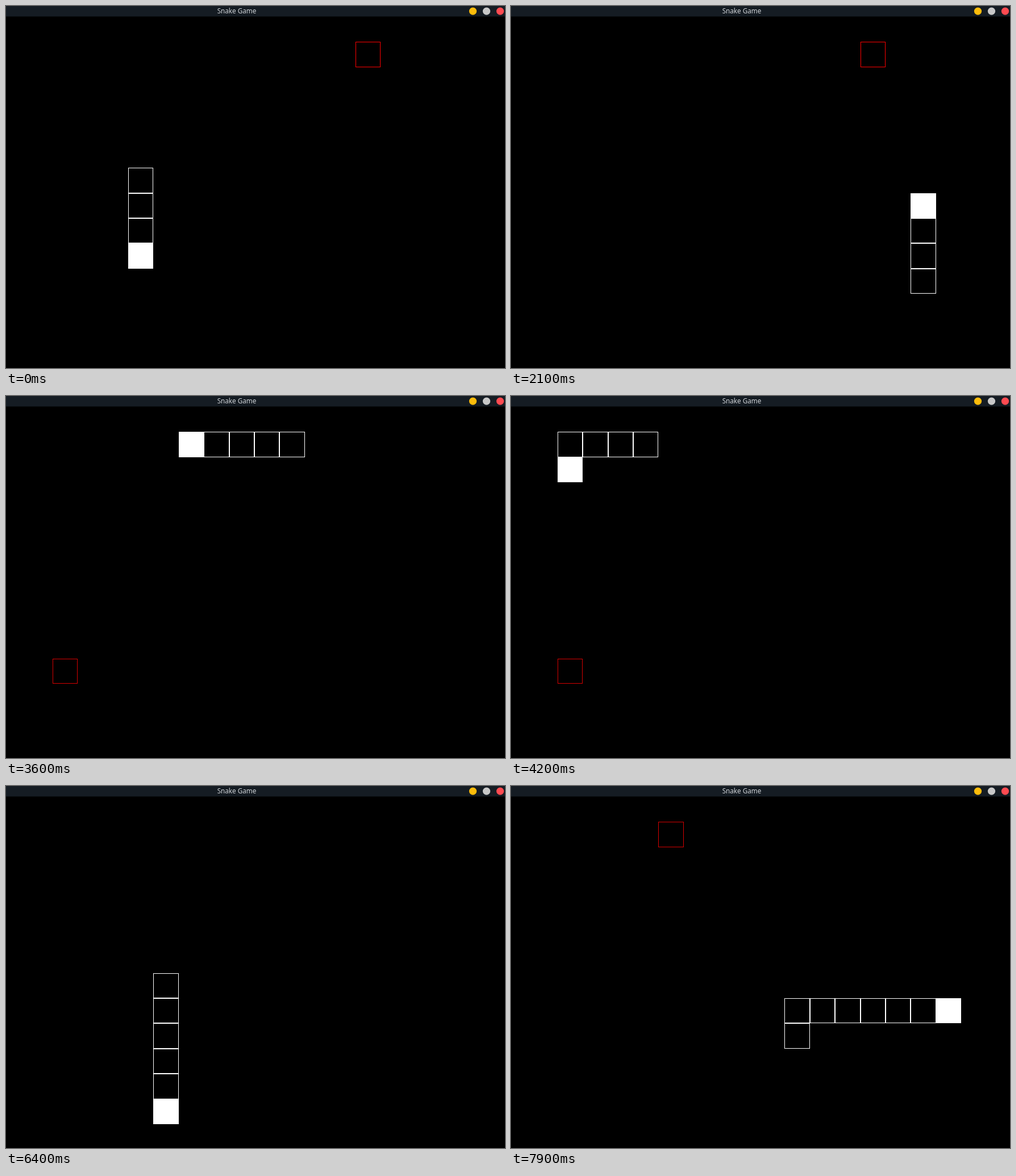
An HTML page with a canvas that plays this animation: 878x638 px, repeating every 8 s.

```html
<!DOCTYPE html>
<html lang="en">
<head>
<meta charset="utf-8">
<title>Snake Game</title>
<style>
  html, body { margin: 0; width: 100%; height: 100%; overflow: hidden; background: #000; }
  svg, canvas { position: absolute; left: 0; top: 0; display: block; }
  text { font: 11.7px "Noto Sans", "Open Sans", sans-serif; fill: #d0d4d8; text-anchor: middle; }
</style>
</head>
<body>
<canvas id="board" width="878" height="638"></canvas>
<svg width="878" height="638">
  <rect width="878" height="18.5" fill="#151c23"/>
  <text x="406" y="12.5">Snake Game</text>
  <circle cx="821.5" cy="9.2" r="6.6" fill="#fdbc0b"/>
  <circle cx="845.5" cy="9.2" r="6.6" fill="#c8c8c8"/>
  <circle cx="869.5" cy="9.2" r="6.6" fill="#ff4b51"/>
</svg>
<script>
const STEP = 100, LOOP = 8000, CELL = 44.4;
const ctx = document.getElementById('board').getContext('2d');

const edgeX = col => Math.round(-6.95 + CELL * col);
const edgeY = row => Math.round(18.85 + CELL * row);

// Corners of the route; the head enters the stage at path index START.
const corners = [[5, 6], [5, 13], [16, 13], [16, 1], [2, 1], [2, 10], [4, 10],
                 [4, 6], [6, 6], [6, 12], [11, 12], [11, 8], [17, 8]];
const START = 3, START_LENGTH = 4;

const path = [corners[0]];
for (const [col, row] of corners.slice(1)) {
  let [x, y] = path[path.length - 1];
  while (x !== col || y !== row) {
    x += Math.sign(col - x);
    y += Math.sign(row - y);
    path.push([x, y]);
  }
}

// Each food lasts until the step at which the head reaches it.
const foods = [
  { cell: [14, 1], eaten: 29, color: '#f00' },
  { cell: [2, 10], eaten: 50, color: '#d40000' },
  { cell: [6, 12], eaten: 64, color: '#d40000' },
  { cell: [14, 8], eaten: 76, color: '#e00000' },
  { cell: [6, 1], eaten: Infinity, color: '#d40000' }
];

function drawCell([col, row], color, filled) {
  const x = edgeX(col), y = edgeY(row);
  const w = edgeX(col + 1) - x, h = edgeY(row + 1) - y;
  ctx.fillStyle = ctx.strokeStyle = color;
  if (filled) ctx.fillRect(x, y, w, h);
  else ctx.strokeRect(x + 0.5, y + 0.5, w - 1, h - 1);
}

function draw(step) {
  ctx.fillStyle = '#000';
  ctx.fillRect(0, 0, 878, 638);

  const score = foods.filter(food => food.eaten < step).length;
  const food = foods[score];
  if (food.eaten !== step) drawCell(food.cell, food.color, false);

  const head = START + step, length = START_LENGTH + score;
  for (let i = head - length + 1; i <= head; i++) {
    drawCell(path[i], '#fff', i === head);
  }
}

const begin = performance.now();
function tick() {
  const time = (performance.now() - begin) % LOOP;
  draw(Math.floor(time / STEP));
  requestAnimationFrame(tick);
}
tick();
</script>
</body>
</html>
```
